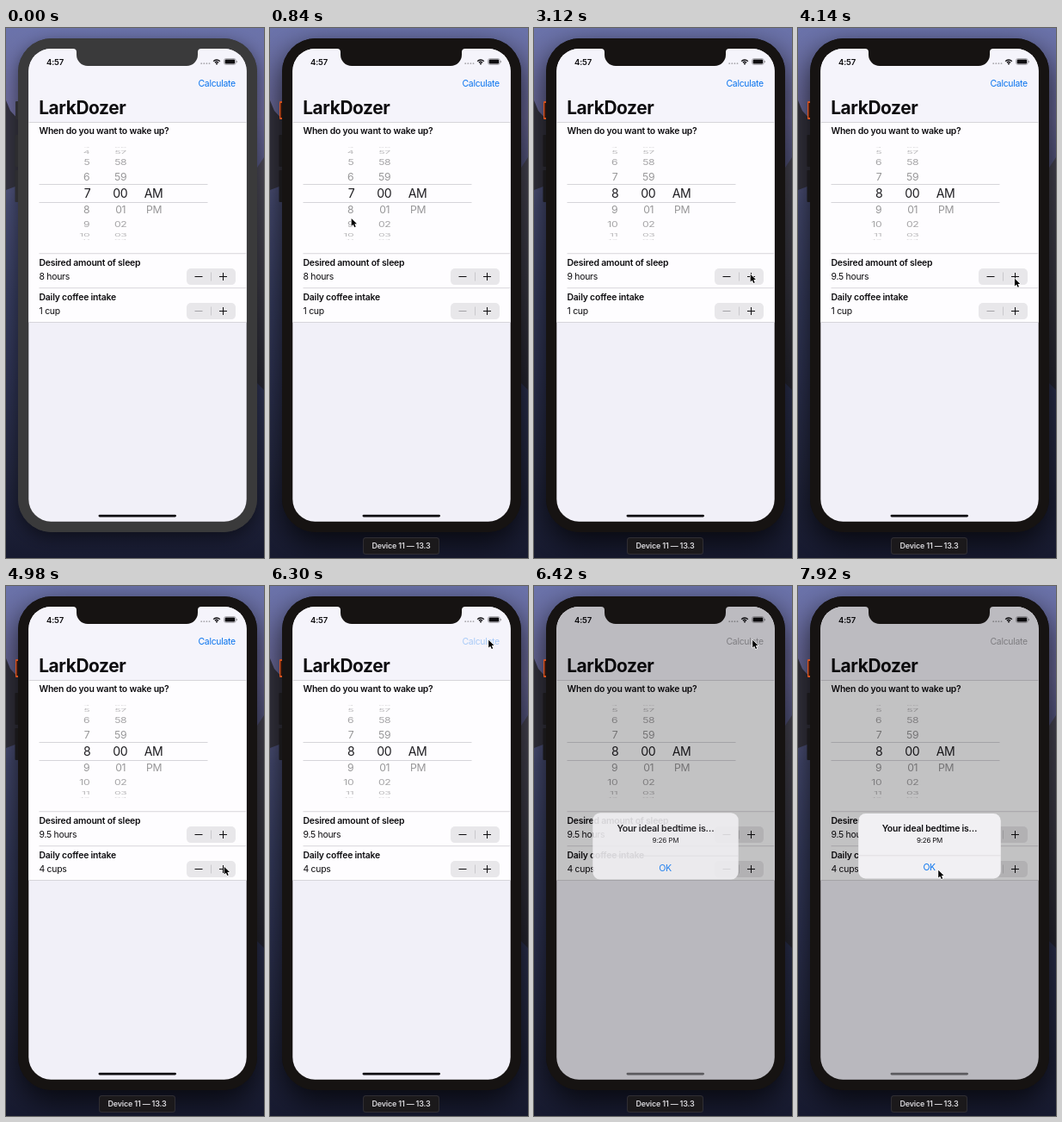
An HTML page with a canvas that plays this animation: 300x615 px, repeating every 8000 ms.

```html
<!DOCTYPE html>
<html lang="en">
<head>
<meta charset="utf-8">
<title>Bedtime calculator</title>
<style>
  html, body { margin: 0; width: 100%; height: 100%; overflow: hidden; background: #14182f; }
  canvas { display: block; }
</style>
</head>
<body>
<canvas width="300" height="615"></canvas>
<script>
const ctx = document.querySelector('canvas').getContext('2d');
const LOOP = 8000, FOCUS = 660, PRESS = 6180, ALERT = 6340;
const BODY = 10.43, INK = '#0e0d10', BLUE = '#0a74ee', LINE = '#d6d5da';

// Pointer path: time, x, y
const pointer = [
  [120, -10, 236], [600, 94, 222], [900, 94, 220], [1440, 96, 198], [1620, 100, 200],
  [1860, 137, 243], [2400, 251, 285], [4080, 251, 285], [4360, 253, 325],
  [5220, 253, 325], [5700, 253.5, 62], [6780, 253.5, 62], [6900, 190, 238],
  [7300, 163, 318], [7620, 163, 321], [7860, 162.5, 329], [LOOP, 162.5, 329]
];

const clamp = v => Math.max(0, Math.min(1, v));
const ramp = (t, a, b) => clamp((t - a) / (b - a));
const ease = p => p * p * (3 - 2 * p);
const countPast = (t, times) => times.filter(s => t >= s).length;

function rect(x, y, w, h, fill, r = 0) {
  ctx.fillStyle = fill;
  ctx.beginPath();
  ctx.roundRect(x, y, w, h, r);
  ctx.fill();
}

function poly(fill, ...points) {
  ctx.fillStyle = fill;
  ctx.beginPath();
  for (let i = 0; i < points.length; i += 2) ctx.lineTo(points[i], points[i + 1]);
  ctx.closePath();
  ctx.fill();
}

function text(s, x, y, size = BODY, weight = 400, fill = INK, align = 'left') {
  ctx.font = `${weight} ${size}px Inter, sans-serif`;
  ctx.letterSpacing = `${(weight > 400 ? -0.019 : -0.026) * size}px`;
  ctx.textAlign = align;
  ctx.fillStyle = fill;
  ctx.fillText(s, x, y);
}

function gradient(y0, y1, ...colors) {
  const g = ctx.createLinearGradient(0, y0, 0, y1);
  colors.forEach((c, i) => g.addColorStop(i / (colors.length - 1), c));
  return g;
}

function wallpaper() {
  rect(0, 0, 300, 615, gradient(0, 615, '#6b73ab', '#6a6898', '#454a70', '#363c5e', '#2c3150', '#23273f', '#171a30'));
  poly('#34333f', 0, 84, 5, 96, 16, 108, 16, 182, 0, 188);
  poly(gradient(150, 420, '#4a4856', '#3a3944', '#25252f'), 300, 150, 292, 162, 280, 182, 280, 400, 300, 420);
}

function phoneBody(active) {
  const shell = active ? '#161312' : '#3a3a3b';
  const button = active ? '#181719' : '#2d2d30';
  ctx.save();
  ctx.shadowColor = `rgba(0,0,0,${active ? 0.75 : 0.5})`;
  ctx.shadowBlur = active ? 34 : 20;
  ctx.shadowOffsetY = active ? 12 : 6;
  rect(14, 12, 278, 573, shell, 39);
  ctx.restore();
  rect(10.5, 124, 5, 37, button, 1);
  rect(10.5, 165, 5, 37, button, 1);
  rect(11, 85, 4, 21, active ? '#d4521f' : button, 1);
  if (active) rect(12.3, 87, 3, 17, '#35160c');
  rect(14, 12, 278, 573, shell, 39);
  return shell;
}

function notch(shell) {
  ctx.fillStyle = shell;
  ctx.beginPath();
  ctx.moveTo(78, 23);
  ctx.lineTo(78, 24);
  ctx.quadraticCurveTo(82, 24, 82, 28);
  ctx.arcTo(82, 44, 97, 44, 13);
  ctx.arcTo(223, 44, 223, 28, 13);
  ctx.lineTo(223, 28);
  ctx.quadraticCurveTo(223, 24, 227, 24);
  ctx.lineTo(227, 23);
  ctx.fill();
}

function statusBar() {
  text('4:57', 47, 42.5, 9.5, 600);
  for (let i = 0; i < 4; i++) rect(226.3 + i * 3.1, 40.3, 1.8, 1.8, '#a9a8ad', 1);
  ctx.strokeStyle = INK;
  ctx.lineWidth = 1.3;
  for (const r of [2.9, 5.3]) {
    ctx.beginPath();
    ctx.arc(245, 42.3, r, -Math.PI * 0.76, -Math.PI * 0.24);
    ctx.stroke();
  }
  rect(244, 40.6, 2, 1.8, INK, 1);
  ctx.strokeStyle = '#8a898e';
  ctx.lineWidth = 0.7;
  ctx.beginPath();
  ctx.roundRect(253.6, 35.6, 13.6, 6.8, 2);
  ctx.stroke();
  rect(254.6, 36.6, 11.6, 4.8, INK, 1.2);
  rect(267.9, 38, 0.9, 2.2, '#8a898e', 0.4);
}

// One wheel: a dim cylinder outside the selection band, flat dark rows inside it
function wheel(x, align, pos, label) {
  const band = [26, 182, 254, 20.5];
  const rows = [];
  for (let i = Math.floor(pos) - 4; i <= pos + 5; i++) {
    if (label(i)) rows.push([label(i), i - pos]);
  }
  ctx.save();
  ctx.beginPath();
  ctx.rect(26, 130, 254, 125);
  ctx.rect(...band);
  ctx.clip('evenodd');
  for (const [s, d] of rows) {
    const angle = d * 0.37, squash = Math.cos(angle);
    if (squash <= 0.03) continue;
    ctx.save();
    ctx.translate(x, 192 + 53.4 * Math.sin(angle));
    ctx.scale(1, squash);
    text(s, 0, 4.4, 12.2, 400, `rgba(0,0,0,${0.15 + 0.28 * squash})`, align);
    ctx.restore();
  }
  ctx.restore();
  ctx.save();
  ctx.beginPath();
  ctx.rect(...band);
  ctx.clip();
  const shift = align === 'right' ? 1 : -0.5;
  for (const [s, d] of rows) text(s, x + shift, 197 + d * 22, 14.1, 400, '#1f1e22', align);
  ctx.restore();
}

function stepper(y, canLower) {
  rect(210, y - 9.5, 57, 19, '#e8e7ea', 5);
  rect(238, y - 5, 1, 10, '#c9c8cc');
  rect(219.5, y - 0.5, 9, 1, canLower ? INK : '#a3a2a6');
  rect(248, y - 0.5, 9, 1, INK);
  rect(252, y - 4.5, 1, 9, INK);
}

function row(y, title, value, canLower) {
  text(title, 38.5, y, BODY, 600);
  text(value, 38.5, y + 16.3);
  stepper(y + 13, canLower);
}

function form(t) {
  const alerted = t >= ALERT;
  rect(26, 24, 254, 549, '#f1f0f8');
  rect(26, 24, 254, 86, '#f5f4fb');
  rect(26, 110, 254, 231, '#fefdff');
  rect(26, 109, 254, 1, LINE);
  statusBar();

  ctx.globalAlpha = alerted ? 1 : 1 - 0.68 * ramp(t, PRESS, PRESS + 80);
  text('Calculate', 223.5, 68, BODY, 400, alerted ? '#a5a4a9' : BLUE);
  ctx.globalAlpha = 1;
  text('LarkDozer', 38.2, 100, 20.86, 700);
  text('When do you want to wake up?', 38.5, 123.2, BODY, 600);

  rect(38.5, 181, 196, 1, LINE);
  rect(38.5, 202, 196, 1, LINE);
  wheel(97.3, 'right', 7 + ease(ramp(t, 900, 1500)), i => String((i + 11) % 12 + 1));
  wheel(133.2, 'center', 0, i => String((i + 60) % 60).padStart(2, '0'));
  wheel(172, 'center', 0, i => ['AM', 'PM'][i]);

  const hours = 8 + countPast(t, [2640, 3060, 3540]) / 2;
  const cups = 1 + countPast(t, [4440, 4680, 4920]);
  rect(38.5, 261.3, 241.5, 1, LINE);
  row(275.6, 'Desired amount of sleep', `${hours} hours`, true);
  rect(38.5, 301.2, 241.5, 1, LINE);
  row(315.6, 'Daily coffee intake', cups > 1 ? `${cups} cups` : '1 cup', cups > 1);
  rect(26, 341, 254, 1, LINE);
  rect(107.5, 564.7, 90.5, 2.8, alerted ? '#77767b' : INK, 1.4);
}

function alertBox(t) {
  const age = t - ALERT;
  if (age < 0) return;
  rect(26, 24, 254, 549, `rgba(0,0,0,${0.235 * clamp(age / 80)})`);
  const scale = 1 + 0.1 * Math.exp(-age / 55);
  ctx.save();
  ctx.globalAlpha = clamp(age / 92);
  ctx.translate(153, 301.8);
  ctx.scale(scale, scale);
  ctx.translate(-153, -301.8);
  rect(70.2, 264, 165.6, 75.6, '#f1f0f3', 8.5);
  rect(70.2, 312.5, 165.6, 0.8, '#d9d8dc');
  text('Your ideal bedtime is…', 153, 285.3, BODY, 600, INK, 'center');
  text('9:26 PM', 153, 297.6, 8, 400, INK, 'center');
  text('OK', 152.6, 330, BODY, 400, BLUE, 'center');
  ctx.restore();
}

function cursor(t) {
  const i = pointer.findIndex(p => p[0] > t);
  if (i < 1) return;
  const [t0, x0, y0] = pointer[i - 1], [t1, x1, y1] = pointer[i];
  const p = ease(ramp(t, t0, t1));
  ctx.save();
  ctx.translate(x0 + (x1 - x0) * p, y0 + (y1 - y0) * p);
  ctx.lineJoin = 'round';
  ctx.lineWidth = 1.4;
  ctx.strokeStyle = '#fff';
  ctx.beginPath();
  for (const [x, y] of [[0.7, 0.8], [0.7, 9.6], [2.8, 7.7], [4.3, 11], [5.7, 10.4], [4.3, 7.1], [7, 7.1]]) ctx.lineTo(x, y);
  ctx.closePath();
  ctx.stroke();
  ctx.fillStyle = '#000';
  ctx.fill();
  ctx.restore();
}

function windowLabel() {
  rect(108, 591, 89, 20, '#302e33', 3.5);
  rect(109, 592, 87, 18, '#1b191b', 2.5);
  text('Device 11 — 13.3', 152.5, 604.2, 9, 600, '#d9d8dc', 'center');
}

function draw(now) {
  const t = now % LOOP, active = t >= FOCUS;
  wallpaper();
  const shell = phoneBody(active);
  ctx.save();
  ctx.beginPath();
  ctx.roundRect(26.3, 24, 253.4, 548.7, 26);
  ctx.clip();
  form(t);
  alertBox(t);
  ctx.restore();
  notch(shell);
  if (active) windowLabel();
  cursor(t);
  requestAnimationFrame(() => draw(performance.now() - start));
}

const start = performance.now();
draw(0);
</script>
</body>
</html>
```
